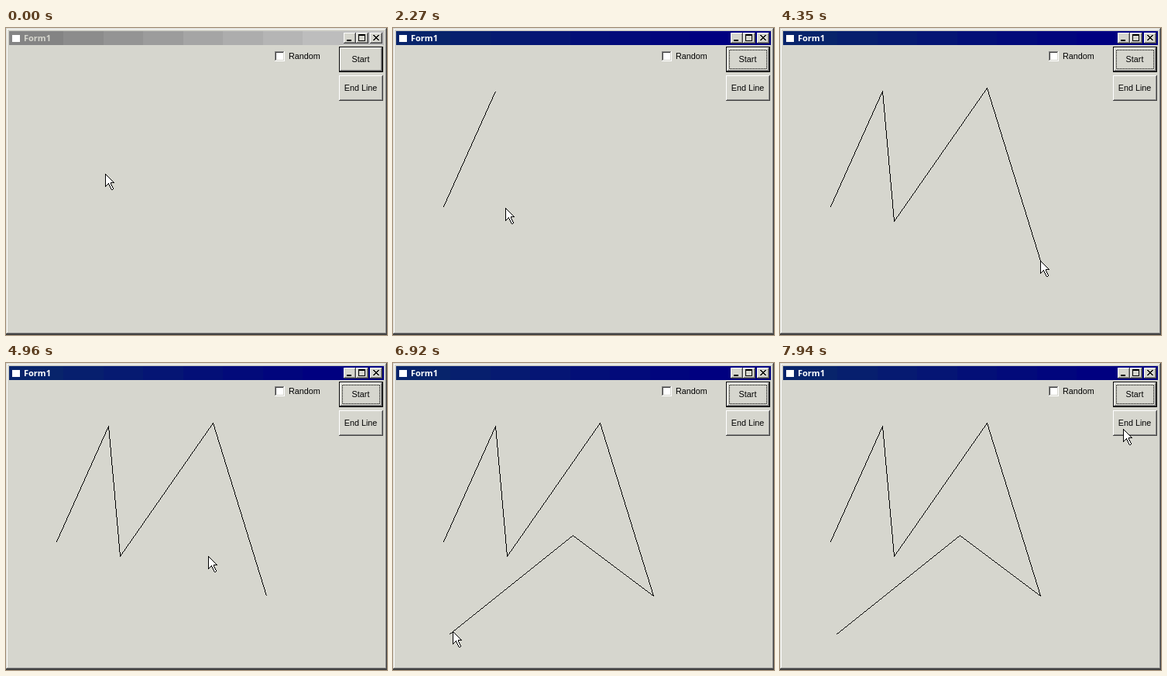
Write an HTML page with a canvas that moves like this. It is 492 by 396 pixels and loops after 8000 ms.

```html
<!DOCTYPE html>
<html lang="en">
<head>
<meta charset="utf-8">
<title>Form1</title>
<style>
  html, body { margin: 0; width: 100%; height: 100%; overflow: hidden; background: #d6d6ce; }
  canvas { display: block; }
</style>
</head>
<body>
<canvas id="stage" width="492" height="396"></canvas>
<script>
const ctx = document.getElementById('stage').getContext('2d');
const LOOP = 8000, TICK = 60, ACTIVATE = 330;
const FACE = '#d6d6ce', SHADOW = '#848484', DARK = '#424242';

// Pointer stops: the move there, in ticks, and when a click draws a line to it
const stop = (x, y, start, ticks, clickAt) => ({ x, y, start, ticks, clickAt });
const home = { x: 128, y: 188 };
const stops = [
  stop(65, 230, 330, 2),
  stop(132, 81, 790, 10, 1590),
  stop(147, 249, 1850, 10, 2590),
  stop(267, 77, 2790, 9, 3530),
  stop(336, 300, 3790, 6, 4350),
  stop(330, 311, 4480, 2),
  stop(232, 222, 4600, 11, 5600),
  stop(72, 350, 5600, 12, 6590),
  stop(436, 96, 6920, 14),
  stop(443, 85, 7760, 4)
];

const ease = k => k * k * (3 - 2 * k);

function pointerAt(t) {
  let at = home;
  for (const s of stops) {
    if (t < s.start) break;
    const k = ease(Math.min(1, (Math.floor((t - s.start) / TICK) + 1) / s.ticks));
    at = { x: Math.round(at.x + (s.x - at.x) * k), y: Math.round(at.y + (s.y - at.y) * k) };
  }
  return at;
}

function rect(x, y, w, h, color = '#000') {
  ctx.fillStyle = color;
  ctx.fillRect(x, y, w, h);
}

// One-pixel bevel: top/left in one colour, bottom/right in another
function edge(x, y, w, h, light, dark) {
  rect(x, y, w, h, dark);
  rect(x, y, w - 1, h - 1, light);
  rect(x + 1, y + 1, w - 2, h - 2, FACE);
}

function raised(x, y, w, h) {
  edge(x, y, w, h, '#fff', DARK);
  edge(x + 1, y + 1, w - 2, h - 2, FACE, SHADOW);
}

function text(label, x, y, align = 'left', color = '#000', font = '10.8px "Liberation Sans", Arial, sans-serif') {
  ctx.font = font;
  ctx.textAlign = align;
  ctx.fillStyle = color;
  ctx.fillText(label, x, y);
}

// Aliased line that leaves out its last pixel
function line(a, b) {
  const dx = b.x - a.x, dy = b.y - a.y;
  const n = Math.max(Math.abs(dx), Math.abs(dy));
  for (let i = 0; i < n; i++) rect(Math.round(a.x + dx * i / n), Math.round(a.y + dy * i / n), 1, 1);
}

function titleBar(active) {
  for (let i = 0; i < 8; i++) {
    const k = i / 7, x = i ? Math.round(22.5 + 51.5 * i) : 4, grey = 132 + 57 * k;
    rect(x, 4, 488 - x, 18, active
      ? `rgb(${8 - 8 * k}, ${36 - 36 * k}, ${107 + 21 * k})`
      : `rgb(${grey}, ${grey}, ${grey})`);
  }
  rect(8, 9, 10, 9, '#fff');
  text('Form1', 23, 17, 'left', active ? '#fff' : FACE, 'bold 11px "Noto Sans", sans-serif');

  for (const x of [436, 452, 470]) raised(x, 6, 16, 14);
  rect(440, 15, 6, 2);
  rect(455, 8, 9, 9);
  rect(456, 10, 7, 6, FACE);
  for (let i = 0; i < 7; i++) {
    rect(474 + i, 9 + i, 2, 1);
    rect(480 - i, 9 + i, 2, 1);
  }
}

function checkBox(label, x, y) {
  edge(x, y, 13, 13, SHADOW, '#fff');
  edge(x + 1, y + 1, 11, 11, DARK, FACE);
  rect(x + 2, y + 2, 9, 9, '#fff');
  text(label, x + 18, y + 10);
}

function button(label, y, isDefault, focused) {
  const inset = isDefault ? 1 : 0;
  rect(430, y, 57, 33);
  raised(430 + inset, y + inset, 57 - 2 * inset, 33 - 2 * inset);
  text(label, 458, y + 20, 'center');
  if (focused) focusDots(434, y + 4, 49, 25);
}

function focusDots(x, y, w, h) {
  for (let i = 1; i < w; i += 2) {
    rect(x + i, y, 1, 1);
    rect(x + i, y + h - 1, 1, 1);
  }
  for (let i = 1; i < h; i += 2) {
    rect(x, y + i, 1, 1);
    rect(x + w - 1, y + i, 1, 1);
  }
}

const arrow = [[0, 0], [0, 16], [4, 12], [7, 19], [8, 20], [9, 20], [10, 19], [7, 12], [7, 11], [11, 11]];

function pointer({ x, y }) {
  const points = arrow.map(([dx, dy]) => ({ x: x + dx, y: y + dy }));
  ctx.beginPath();
  for (const p of points) ctx.lineTo(p.x + 0.5, p.y + 0.5);
  ctx.fillStyle = '#fff';
  ctx.fill();
  points.forEach((p, i) => line(p, points[(i + 1) % points.length]));
}

function drawing(t) {
  let pen = stops[0];
  for (const s of stops) {
    if (!(t >= s.clickAt)) continue;
    line(pen, s);
    pen = s;
  }
}

function draw(now) {
  const t = now % LOOP, active = t >= ACTIVATE;
  rect(0, 0, 492, 396, DARK);
  edge(0, 0, 492, 395, FACE, DARK);
  edge(1, 1, 490, 393, '#fff', SHADOW);
  titleBar(active);
  checkBox('Random', 347, 30);
  button('Start', 24, true, active);
  button('End Line', 61);
  drawing(t);
  pointer(pointerAt(t));
  requestAnimationFrame(draw);
}
requestAnimationFrame(draw);
</script>
</body>
</html>
```
